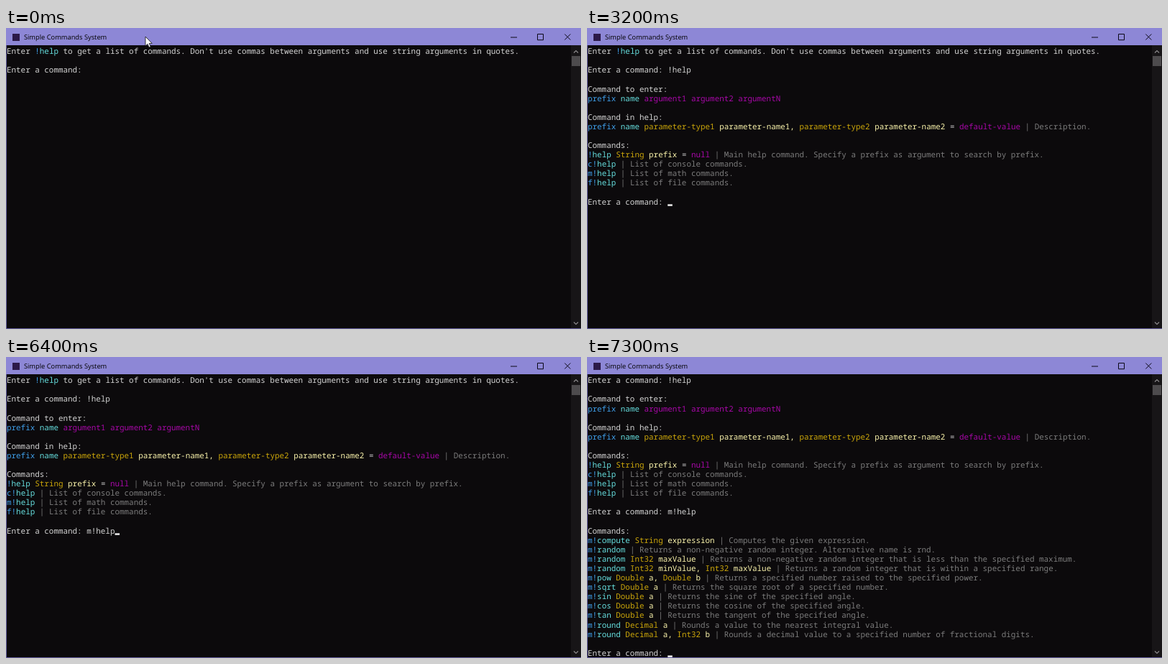
Write an HTML page with a canvas that moves like this. It is 800 px wide and 419 px high and loops after 8 s.

```html
<!DOCTYPE html>
<html lang="en">
<head>
<meta charset="utf-8">
<title>Simple Commands System</title>
<style>
  html, body { margin: 0; width: 100%; height: 100%; overflow: hidden; background: #0c0a0c; }
  canvas { display: block; }
</style>
</head>
<body>
<canvas id="stage" width="800" height="419"></canvas>
<script>
const ctx = document.getElementById('stage').getContext('2d');
const LOOP = 8000, ROWS = 30, CELL_W = 8, CELL_H = 16, SCALE = 0.818;

const COLORS = {
  w: '#d4d4d4', // plain text
  p: '#3f9fea', // prefix
  n: '#66dede', // command name
  a: '#a808a8', // argument
  t: '#cba60a', // parameter type
  v: '#fbf4ac', // parameter name
  g: '#7c7c7c', // description
};

// "~x" switches to the colour with key x.
const command = (prefix, name, params, description) => {
  const colored = params
    .replace(/([\w-]+) ([\w-]+,?)/g, '~t$1 ~v$2')
    .replace(/= (\S+)/, '~w= ~a$1');
  return `~p${prefix}~n${name} ${colored}${params && ' '}~g| ${description}`;
};
const math = (name, params, description) => command('m!', name, params, description);

const PROMPT = 'Enter a command: ';
const transcript = [
  "Enter ~p!~nhelp~w to get a list of commands. Don't use commas between arguments and use string arguments in quotes.",
  '',
  PROMPT + '!help',
  '',
  'Command to enter:',
  '~pprefix ~nname ~aargument1 argument2 argumentN',
  '',
  'Command in help:',
  command('prefix', ' name', 'parameter-type1 parameter-name1, parameter-type2 parameter-name2 = default-value', 'Description.'),
  '',
  'Commands:',
  command('!', 'help', 'String prefix = null', 'Main help command. Specify a prefix as argument to search by prefix.'),
  command('c!', 'help', '', 'List of console commands.'),
  command('m!', 'help', '', 'List of math commands.'),
  command('f!', 'help', '', 'List of file commands.'),
  '',
  PROMPT + 'm!help',
  '',
  'Commands:',
  math('compute', 'String expression', 'Computes the given expression.'),
  math('random', '', 'Returns a non-negative random integer. Alternative name is rnd.'),
  math('random', 'Int32 maxValue', 'Returns a non-negative random integer that is less than the specified maximum.'),
  math('random', 'Int32 minValue, Int32 maxValue', 'Returns a random integer that is within a specified range.'),
  math('pow', 'Double a, Double b', 'Returns a specified number raised to the specified power.'),
  math('sqrt', 'Double a', 'Returns the square root of a specified number.'),
  math('sin', 'Double a', 'Returns the sine of the specified angle.'),
  math('cos', 'Double a', 'Returns the cosine of the specified angle.'),
  math('tan', 'Double a', 'Returns the tangent of the specified angle.'),
  math('round', 'Decimal a', 'Rounds a value to the nearest integral value.'),
  math('round', 'Decimal a, Int32 b', 'Rounds a decimal value to a specified number of fractional digits.'),
  '',
  PROMPT,
];

// [start ms, caret row, caret column, caret visible]
const steps = [
  [0, 2, 17, 0], [600, 2, 17, 1], [1100, 2, 17, 0],
  [1600, 2, 18, 0], [2000, 2, 19, 1], [2200, 2, 20, 1], [2400, 2, 21, 1], [2700, 2, 22, 0],
  [3200, 16, 17, 1], [4300, 16, 17, 0], [4800, 16, 17, 1],
  [5000, 16, 18, 1], [5300, 16, 18, 0], [5500, 16, 19, 1], [5800, 16, 20, 1],
  [6100, 16, 21, 1], [6200, 16, 22, 1], [6400, 16, 23, 1],
  [6900, 24, 0, 1], [7000, 31, 17, 1],
];

function rect(color, x, y, w, h) {
  ctx.fillStyle = color;
  ctx.fillRect(x, y, w, h);
}

function stroke(color, width, path) {
  ctx.strokeStyle = color;
  ctx.lineWidth = width;
  ctx.stroke(new Path2D(path));
}

function drawWindow() {
  rect('#0c0a0c', 0, 0, 800, 419);
  rect('#8d87d6', 0, 0, 800, 24);
  rect('#625c9c', 0, 24, 1, 395);
  rect('#625c9c', 0, 418, 800, 1);
  rect('#2c1a48', 9, 8, 10, 10);

  ctx.fillStyle = '#000';
  ctx.font = '9.3px "Open Sans", sans-serif';
  ctx.fillText('Simple Commands System', 24.9, 16.4);
  stroke('#0a0816', 1, 'M702 13h9M739.5 8.5h8v8.2h-8z');
  stroke('#0a0816', 1, 'M777.3 8.5l8 8m0-8l-8 8');

  rect('#171517', 786, 24, 14, 394);
  rect('#4d4b4d', 787, 39, 12, 14);
  stroke('#8a888a', 1.2, 'M790 34.5l3-3 3 3M790 409.5l3 3 3-3');
}

function drawLine(line, row) {
  let column = 0;
  for (const part of ('~w' + line).split('~').slice(1)) {
    const text = part.slice(1);
    ctx.fillStyle = COLORS[part[0]];
    ctx.fillText(text, column * CELL_W, row * CELL_H + 13.4);
    column += text.length;
  }
}

function drawConsole(row, column, caretVisible) {
  const top = Math.max(0, row - ROWS + 1);
  ctx.save();
  ctx.translate(1, 25.3);
  ctx.scale(SCALE, SCALE);
  ctx.font = '13.333px "Noto Sans Mono", monospace';
  for (let i = top; i < row; i++) drawLine(transcript[i], i - top);
  drawLine(transcript[row].slice(0, column), row - top);
  if (caretVisible) {
    rect('#f2f2f2', column * CELL_W, (row - top) * CELL_H + 13, CELL_W, 3);
  }
  ctx.restore();
}

function drawPointer(x, y) {
  const arrow = new Path2D(`M${x} ${y}v13l3-2.8 2 4.8 2.2-1-2-4.6h4z`);
  ctx.fillStyle = '#fff';
  ctx.fill(arrow);
  stroke('#111', 0.8, arrow);
}

function draw(now) {
  const time = now % LOOP;
  const [, row, column, caret] = steps.findLast(step => step[0] <= time) || steps[0];
  drawWindow();
  drawConsole(row, column, caret);
  if (time < 100) drawPointer(194, 12);
  requestAnimationFrame(draw);
}

ctx.textRendering = 'geometricPrecision';
requestAnimationFrame(draw);
</script>
</body>
</html>
```
